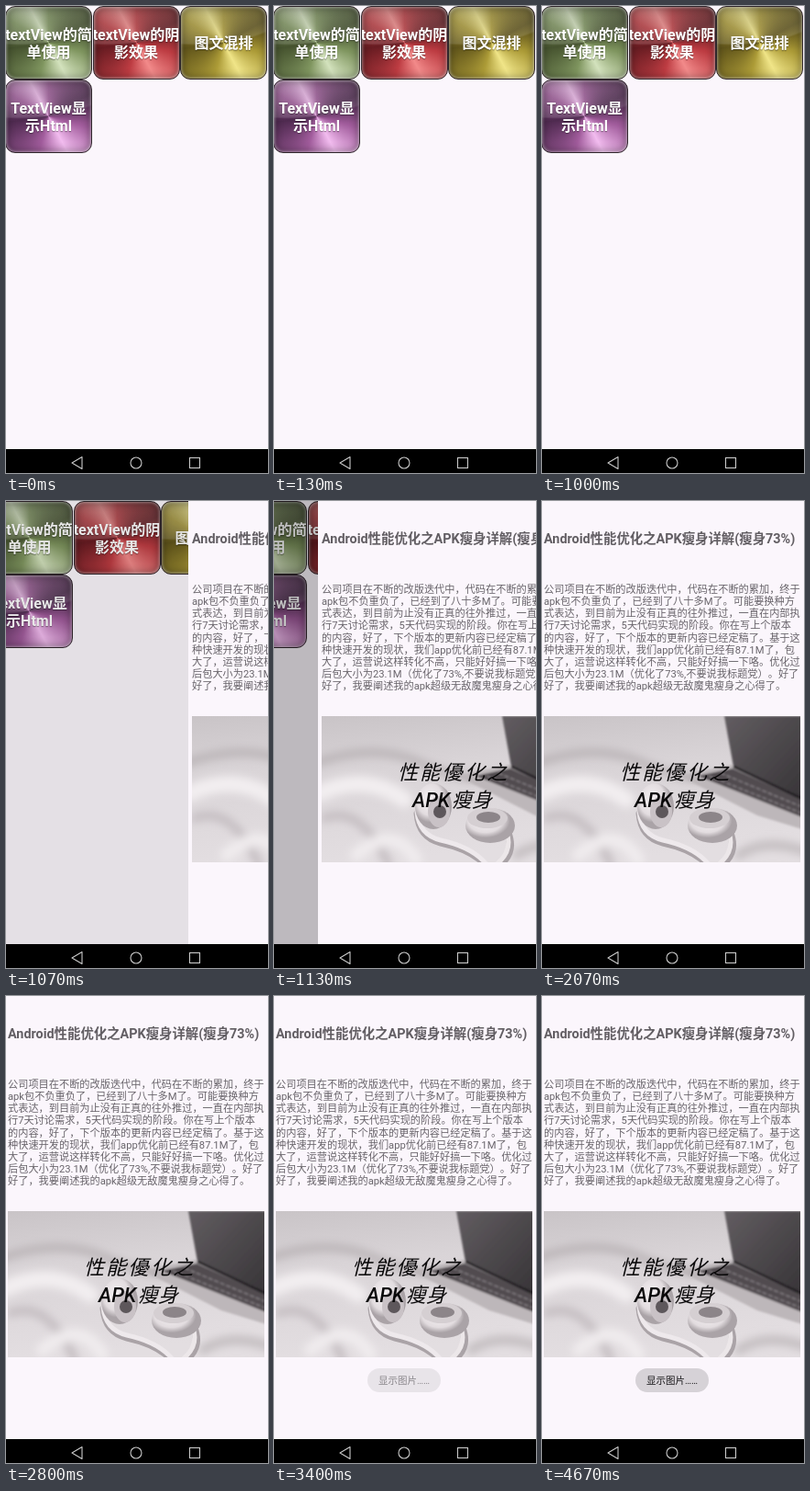
Animation, 286 px wide and 508 px high, one loop 4740 ms. Source, as an HTML page:

```html
<!DOCTYPE html>
<html lang="zh-CN">
<head>
<meta charset="utf-8">
<style>
html, body { margin: 0; width: 100%; height: 100%; overflow: hidden; background: #000; }
body { font-family: Roboto, "Noto Sans CJK SC", "Noto Sans CJK", sans-serif; text-spacing-trim: space-all; }
#stage { position: relative; width: 286px; height: 508px; overflow: hidden; }
#launcher, #page, #dim { position: absolute; left: 0; top: 0; width: 286px; height: 482px; }
#launcher, #stage { background: #fbf6fc; }
#dim { background: #000; }
svg { position: absolute; left: 0; top: 0; overflow: visible; }
.tile {
  position: absolute; box-sizing: border-box; width: 95px; height: 80px; padding-top: 1px;
  border: 1px solid #30272c; border-radius: 11px; overflow: hidden;
  display: flex; flex-direction: column; align-items: center; justify-content: center;
  color: #fff; font: bold 16px/19px Roboto, "Noto Sans CJK SC", "Noto Sans CJK", sans-serif;
  white-space: nowrap; text-shadow: 0 1px 1px #0006;
  box-shadow: inset 0 0 3px 1px #fff6, inset 0 0 9px 2px #0005;
  background:
    radial-gradient(ellipse 110px 48px at 18% -8%, #fff2 0 96%, #0000 100%),
    linear-gradient(#0003, #0000 60%),
    conic-gradient(var(--mid), var(--dark) 62deg, var(--mid) 105deg, var(--light) 152deg,
      var(--mid) 195deg, var(--dark) 262deg, var(--mid) 300deg, var(--light) 332deg, var(--mid));
}
</style>
</head>
<body>
<div id="stage">
  <div id="launcher"></div>
  <div id="dim"></div>
  <div id="page">
    <svg width="286" height="482">
      <defs>
        <linearGradient id="wall" x2="0.2" y2="1">
          <stop stop-color="#c9c4c7"/><stop offset=".4" stop-color="#d9d4d7"/><stop offset="1" stop-color="#e3dee1"/>
        </linearGradient>
        <linearGradient id="screen" x2="1" y2="1">
          <stop stop-color="#625d61"/><stop offset="1" stop-color="#373437"/>
        </linearGradient>
        <radialGradient id="cup" cx=".4" cy=".35">
          <stop stop-color="#f6f2f4"/><stop offset=".7" stop-color="#e2dcdf"/><stop offset="1" stop-color="#aaa3a7"/>
        </radialGradient>
        <filter id="soft"><feGaussianBlur stdDeviation="5"/></filter>
        <filter id="slight"><feGaussianBlur stdDeviation="1"/></filter>
        <clipPath id="frame"><rect x="2" y="234" width="280" height="159"/></clipPath>
      </defs>
      <rect x="-2" width="290" height="482" fill="#fbf6fc"/>
      <text x="2" y="46" font-size="14.4" font-weight="bold" fill="#625e63">Android性能优化之APK瘦身详解(瘦身73%)</text>
      <g id="article" font-size="11.2" fill="#68646a"></g>
      <g clip-path="url(#frame)">
        <rect x="2" y="234" width="280" height="159" fill="url(#wall)"/>
        <g filter="url(#soft)" fill="none" stroke-linecap="round">
          <path d="M-5 285Q60 262 110 285T205 300" stroke="#bbb5b8" stroke-width="9"/>
          <path d="M0 318Q50 295 92 325" stroke="#f2eef0" stroke-width="18"/>
          <path d="M5 345Q45 330 75 395" stroke="#c4bdc1" stroke-width="9"/>
          <path d="M40 385Q80 350 105 390" stroke="#f0ecee" stroke-width="14"/>
          <path d="M215 385Q245 365 290 382" stroke="#c3bdc0" stroke-width="10"/>
        </g>
        <g filter="url(#slight)">
          <path d="M150 299L207 287L284 322V357L235 342Z" fill="#bdb7ba"/>
          <path d="M170 299L208 291L284 325V344Z" fill="#514c50"/>
          <path d="M182 299L282 339M195 296L282 332" stroke="#8b8589" stroke-width="1.2" stroke-dasharray="5 2"/>
          <path d="M199 234H284V324L209 289Z" fill="url(#screen)"/>
          <path d="M209 289L284 324" stroke="#211f21" stroke-width="3"/>
        </g>
        <g fill="none" stroke-linecap="round">
          <path d="M106 340Q108 366 132 372Q165 379 181 396" stroke="#aaa3a7" stroke-width="7"/>
          <path d="M106 338Q108 363 132 369Q165 376 181 394" stroke="#eee9ec" stroke-width="5"/>
          <path d="M205 360Q214 382 196 396" stroke="#aaa3a7" stroke-width="8"/>
          <path d="M204 360Q211 381 193 395" stroke="#ece7e9" stroke-width="5"/>
        </g>
        <ellipse cx="124" cy="332" rx="20" ry="25" fill="url(#cup)"/>
        <ellipse cx="130" cy="338" rx="12" ry="17" fill="#c9c2c6"/>
        <circle cx="131" cy="338" r="7" fill="#5d575b"/>
        <ellipse cx="186" cy="353" rx="27" ry="19" fill="url(#cup)"/>
        <ellipse cx="183" cy="345" rx="22" ry="11" fill="#d5cfd2"/>
        <ellipse cx="184" cy="344" rx="13" ry="6" fill="#8c8589"/>
        <g fill="#0a090a" font-style="italic" font-weight="500">
          <text x="85" y="303" font-size="22" letter-spacing="2.3">性能優化之</text>
          <text x="101" y="333" font-size="22">APK</text>
          <text x="144" y="333" font-size="22">瘦身</text>
        </g>
      </g>
      <g id="toast">
        <rect x="102" y="405" width="80" height="26" rx="13" fill="#d6d2d7"/>
        <text x="114" y="422" font-size="10.5" fill="#171618">显示图片……</text>
      </g>
    </svg>
  </div>
  <svg width="286" height="508" fill="none" stroke="#c9c9c9" stroke-width="1.1">
    <rect y="482" width="286" height="26" fill="#000" stroke="none"/>
    <path d="M72 497L83 490.5V503.500Z" stroke-linejoin="round"/>
    <circle cx="142" cy="497" r="6"/>
    <rect x="200.500" y="491.500" width="11" height="11"/>
  </svg>
</div>
<script>
const LOOP = 4740;
const WIDTH = 286;
const $ = id => document.getElementById(id);
const clamp = v => Math.max(0, Math.min(1, v));

const tiles = [
  { lines: ['textView的简', '单使用'], colors: ['#46532f', '#7f955f', '#d3e2bd'] },
  { lines: ['textView的阴', '影效果'], colors: ['#681c22', '#bd3c42', '#f28a8a'] },
  { lines: ['图文混排'], colors: ['#62561b', '#ac9b37', '#f0e588'] },
  { lines: ['TextView显', '示Html'], colors: ['#4f2a50', '#a15c9c', '#f2bcef'] }
];
$('launcher').innerHTML = tiles.map(({ lines, colors: [dark, mid, light] }, i) => {
  const left = -1 + 95.5 * (i % 3), top = 80 * Math.floor(i / 3);
  return `<div class="tile" style="left:${left}px;top:${top}px;--dark:${dark};--mid:${mid};--light:${light}">` +
    lines.map(line => `<div>${line}</div>`).join('') + '</div>';
}).join('');

const article = [
  '公司项目在不断的改版迭代中，代码在不断的累加，终于',
  'apk包不负重负了，已经到了八十多M了。可能要换种方',
  '式表达，到目前为止没有正真的往外推过，一直在内部执',
  '行7天讨论需求，5天代码实现的阶段。你在写上个版本',
  '的内容，好了，下个版本的更新内容已经定稿了。基于这',
  '种快速开发的现状，我们app优化前已经有87.1M了，包',
  '大了，运营说这样转化不高，只能好好搞一下咯。优化过',
  '后包大小为23.1M（优化了73%,不要说我标题党）。好了',
  '好了，我要阐述我的apk超级无敌魔鬼瘦身之心得了。'
];
$('article').innerHTML = article
  .map((line, i) => `<text x="2" y="${100 + 13.15 * i}">${line}</text>`).join('');

function render(t) {
  // The page glides in from the right while the launcher drifts left and darkens.
  const x = t <= 1010 ? WIDTH + 4 : Math.min(WIDTH + 4, 51 * Math.exp((1130 - t) / 43));
  const entered = clamp(1 - x / WIDTH);
  $('page').style.transform = `translateX(${Math.round(x)}px)`;
  $('launcher').style.transform = `translateX(${Math.round(-70 * entered)}px)`;
  $('dim').style.opacity = 0.3 * entered;

  const fade = clamp((t - 3284) / 400);
  $('toast').setAttribute('opacity', 1 - (1 - fade) ** 2);
}

function tick() {
  render(performance.now() % LOOP);
  requestAnimationFrame(tick);
}
tick();
</script>
</body>
</html>
```
